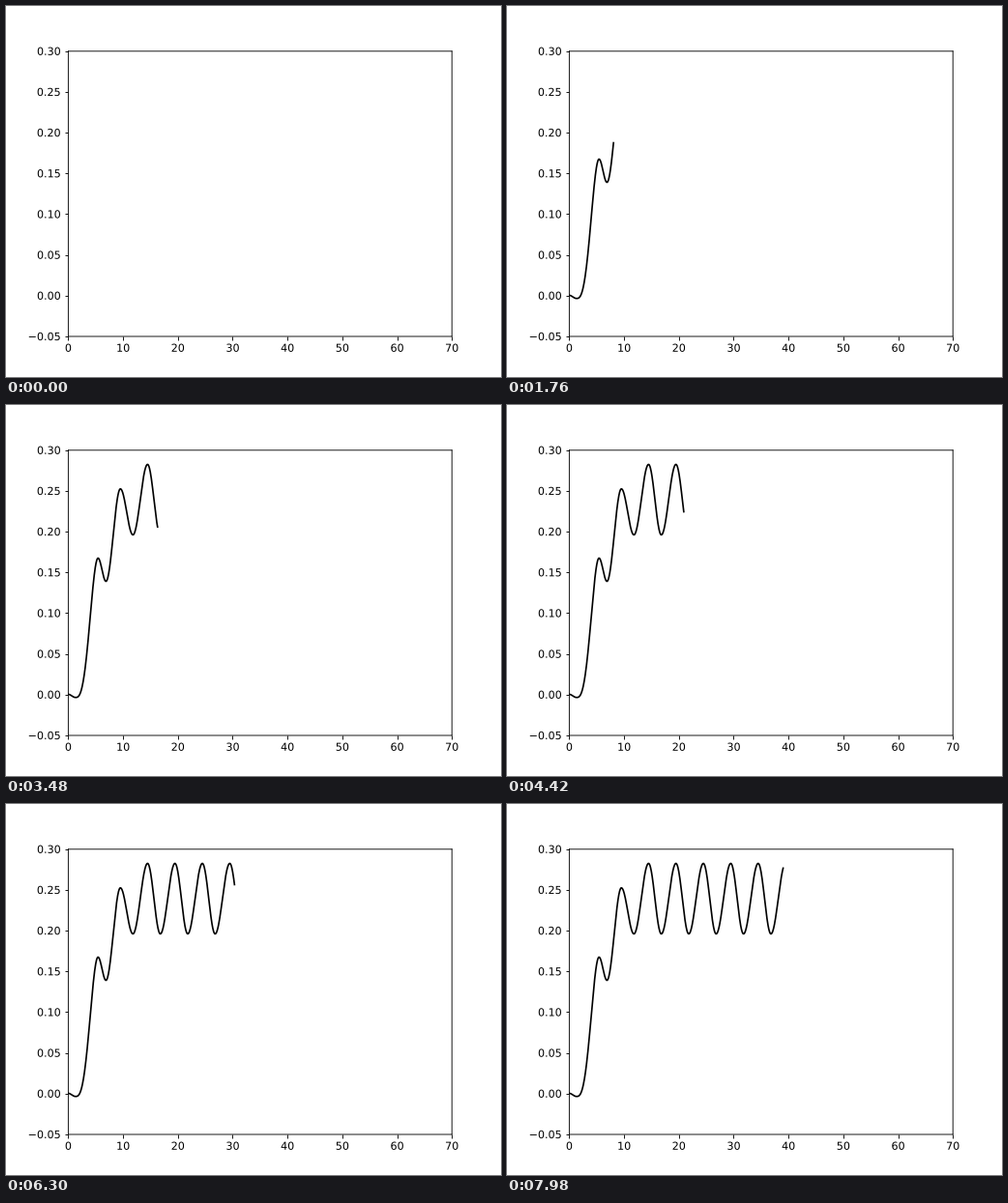
Recreate the animation shown at these times as a matplotlib script. Size 512 px wide and 384 px high, loop 8 s.

```python
import numpy as np
import matplotlib.pyplot as plt
from matplotlib.animation import FuncAnimation
from matplotlib.patheffects import Normal
from matplotlib.transforms import Affine2D

W, H, DPI = 512, 384, 80
FRAMES, STEP_MS = 400, 20

# Turning points (time, value) of the curve; the last swing then repeats
TURNS = [(0, 0), (1.4, -0.004), (5.5, 0.167), (6.95, 0.1385), (9.58, 0.252),
         (11.87, 0.1955), (14.54, 0.282), (16.87, 0.1955)]
T, V = np.array(TURNS).T
CYCLE_START, PERIOD = 11.87, 5.0
RISE, RISE_SKEW = 1, 1.4  # the first long climb starts slowly


def response(t):
    """Cosine easing from one turning point to the next."""
    t = np.where(t > CYCLE_START,
                 CYCLE_START + (t - CYCLE_START) % PERIOD, t)
    i = np.clip(np.searchsorted(T, t, side="right") - 1, 0, len(T) - 2)
    u = (t - T[i]) / (T[i + 1] - T[i])
    u = u ** np.where(i == RISE, RISE_SKEW, 1)
    return V[i] + (V[i + 1] - V[i]) * (1 - np.cos(np.pi * u)) / 2


def tip_time(frame):
    """Time reached by the tip, speeding up slightly."""
    return frame * (0.0910 + 1.75e-5 * frame)


# Draw lines and text at sub-pixel positions
plt.rcParams.update({"path.snap": False, "path.effects": [Normal()]})

fig = plt.figure(figsize=(W / DPI, H / DPI), dpi=DPI)
ax = fig.add_axes((64.4 / W, 42 / H, 396.8 / W, 295.2 / H))
ax.set_xlim(0, 70)
ax.set_ylim(-0.05, 0.30)
line, = ax.plot([], [], color="black", lw=1.5,
                transform=ax.transData + Affine2D().translate(-0.4, 0.5))


def update(frame):
    t = np.linspace(0, tip_time(frame), 2 * frame)
    line.set_data(t, response(t))
    return line,


anim = FuncAnimation(fig, update, frames=FRAMES, interval=STEP_MS,
                     init_func=lambda: update(0), repeat=True,
                     repeat_delay=0, blit=True)
plt.show()
```
